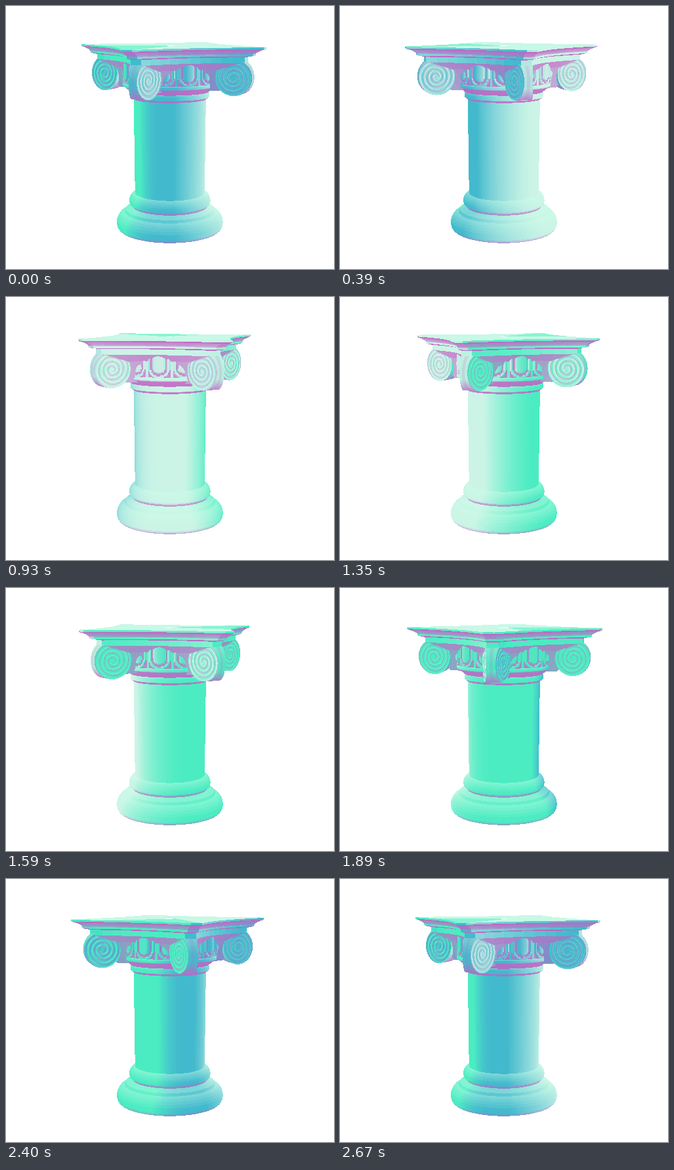
Write an HTML page with a canvas that moves like this. It is 500 px wide and 400 px high and loops after 2700 ms.

```html
<!DOCTYPE html>
<html lang="en">
<head>
<meta charset="utf-8">
<title>Turning column</title>
<style>
html, body { margin: 0; width: 100%; height: 100%; overflow: hidden; background: #fff; }
canvas { display: block; width: 500px; height: 400px; }
</style>
</head>
<body>
<canvas id="stage" width="500" height="400"></canvas>
<script>
const W = 500, H = 400, CX = 249.8, HORIZON = 13.2, DIST = 1106;
const STEP = 30, LOOP = 2700, TURN = 89;
const TAU = Math.PI * 2, RAD = Math.PI / 180;
const CORNER = 22.7 * RAD;

const BLUE = [66, 185, 205], PALE = [203, 244, 230], GREEN = [75, 236, 194];
const MINT = [204, 255, 232], DARK = [194, 98, 196];

const clamp = v => Math.max(0, Math.min(1, v));
const mix = (a, b, t) => a.map((v, i) => v + (b[i] - v) * t);
const lerp = (a, b, t) => a + (b - a) * t;
const fade = (v, from, to) => Math.sin(clamp((v - from) / (to - from)) * Math.PI / 2);
const dir = a => [Math.cos(a), 0, Math.sin(a)];
const sub = (a, b) => a.map((v, i) => v - b[i]);
const cross = (a, b) => [
  a[1] * b[2] - a[2] * b[1], a[2] * b[0] - a[0] * b[2], a[0] * b[1] - a[1] * b[0]
];
const unit = v => {
  const l = Math.hypot(...v) || 1;
  return v.map(c => c / l);
};
// base + p * a + q * b
const along = (base, p, a, q, b) => base.map((v, i) => v + p[i] * a + q[i] * b);

// Three coloured lights stand around the column
function light(n) {
  const az = (450 - Math.atan2(n[2], n[0]) / RAD) % 360;
  let c = mix(BLUE, PALE, fade(az, 5, 110));
  c = mix(c, GREEN, fade(az, 150, 240));
  return mix(c, BLUE, fade(az, 305, 345));
}

function shade(n, dark = 0) {
  const up = -n[1];
  let c = mix(light(n), MINT, clamp(up) * 0.45);
  c = mix(c, DARK, clamp((-up - 0.35) * 1.2));
  return mix(c, DARK, dark);
}

const quads = [];

function grid(point, nu, nv, paint, face) {
  for (let j = 0; j < nv; j++) {
    for (let i = 0; i < nu; i++) {
      const a = point(i, j), b = point(i + 1, j), c = point(i + 1, j + 1), d = point(i, j + 1);
      const n = face || unit(cross(
        sub(along(c, d, 1, c, 0), along(a, b, 1, a, 0)),
        sub(along(b, c, 1, b, 0), along(a, d, 1, a, 0))));
      const [r, g, bl] = paint(n, i, j).map(Math.round);
      quads.push({ pts: [a, b, c, d], n, mid: along(a, sub(c, a), 0.5, a, 0),
        ink: (255 << 24 | bl << 16 | g << 8 | r) >>> 0 });
    }
  }
}

// Draws a moulding profile piece by piece; a bulge gives a half-round piece
class Profile {
  constructor(x, y) { this.rows = [{ x, y }]; }
  to(x, y, bulge = 0, dark = 0) {
    const from = this.rows[this.rows.length - 1], n = bulge ? 10 : 1;
    from.dark = dark;
    for (let k = 1; k <= n; k++) {
      const a = k / n * Math.PI, t = (1 - Math.cos(a)) / 2;
      this.rows.push({ x: lerp(from.x, x, t) + bulge * Math.sin(a), y: lerp(from.y, y, t), dark });
    }
    return this;
  }
}

// Round parts: x is the radius
function lathe({ rows }) {
  grid((i, j) => {
    const { x, y } = rows[j], a = i / 120 * TAU;
    return [x * Math.cos(a), y - HORIZON, x * Math.sin(a)];
  }, 120, rows.length - 1, (n, i, j) => shade(n, rows[j].dark));
}

// Square parts with hollow sides: x is the inset from the slab's edge
function sweep({ rows }) {
  grid((i, j) => {
    const { x, y } = rows[j], t = i % 11 / 5 - 1;
    const psi = CORNER + Math.PI / 4 + Math.floor(i / 11) * Math.PI / 2;
    const hollow = Math.min(15, 100 - x) * (1 - t * t);
    return along([0, y, 0], dir(psi), 111 - x - hollow, dir(psi + Math.PI / 2), t * (100 - x));
  }, 44, rows.length - 1, (n, i, j) => shade(n, rows[j].dark));
}

function eggs() {
  const pitch = TAU / 12, nu = 240, nv = 18;
  const place = (i, j) => {
    const a = i / nu * TAU, s = (a - CORNER - Math.PI / 4) / pitch;
    const p = (s - Math.round(s)) * pitch * 72, y = 69 + j / nv * 34;
    const d = Math.hypot(p, Math.max(0, y - 88));
    return { a, y, p, d, ridge: d > 12.5 && d < 16.5 };
  };
  grid((i, j) => {
    const { a, y, d, ridge } = place(i, j);
    const r = 70 + (ridge ? 2 : 4 * Math.sqrt(Math.max(0, 1 - d * d / 100)));
    return [r * Math.cos(a), y, r * Math.sin(a)];
  }, nu, nv, (n, i, j) => {
    const { d, p, ridge } = place(i + 0.5, j + 0.5);
    return shade(n, ridge || d < 9.5 || Math.abs(p) > 17.5 ? 0.05 : 0.65);
  });
}

function volute(phi) {
  const R = 27, down = [0, 1, 0];
  const side = s => ({
    mid: along([0, 91, 0], dir(phi), 105.5, dir(phi + Math.PI / 2), 13 * s),
    out: dir(phi - 15 * RAD * s),
    n: dir(phi + 75 * RAD * s)
  });
  const left = side(1), right = side(-1);
  const on = (f, r, a) => along(f.mid, f.out, r * Math.cos(a), down, r * Math.sin(a));

  for (const f of [left, right]) {
    const nu = 56, nv = 18;
    grid((i, j) => on(f, R * j / nv, i / nu * TAU), nu, nv, (n, i, j) => {
      const r = R * (j + 0.5) / nv, a = (i + 0.5) / nu * TAU;
      if (r < 3) return shade(n);
      const w = (r / 6.5 - a / TAU) * TAU, k = Math.sin(w) * 0.55;
      const bent = unit(along(n, f.out, k * Math.cos(a), down, k * Math.sin(a)));
      return shade(bent, Math.max(0, Math.cos(w) - 0.3) * 0.5);
    }, f.n);
  }
  grid((i, j) => {
    const a = i / 48 * TAU;
    return mix(on(left, R, a), on(right, R, a), j / 3);
  }, 48, 3, (n, i, j) => shade(n, j === 1 ? 0.2 : 0.05));
}

// Slab and the web that carries the volutes
sweep(new Profile(100, 47).to(0, 47).to(0, 49.5).to(2, 51, 0, 0.9).to(11, 57.5, 2, 0.3)
  .to(12, 60).to(20, 62, 0, 0.7).to(20, 70).to(30, 80, 0, 0.5).to(48, 112, 0, 0.5));
eggs();
for (let k = 0; k < 4; k++) volute(CORNER + k * Math.PI / 2);
// Neck, shaft and foot
lathe(new Profile(70, 116).to(69, 122, 2).to(59, 130, 0, 0.7).to(59, 138, 1)
  .to(55, 141, 0, 0.6).to(53, 283).to(57, 301, 6.5).to(57, 303, 0, 0.6)
  .to(67, 307).to(69, 311).to(73, 337.5, 9.5));

const ctx = document.getElementById('stage').getContext('2d');
const image = ctx.createImageData(W, H);
const pixels = new Uint32Array(image.data.buffer);
const depth = new Float32Array(W * H);

function fill(a, b, c, ink) {
  const area = (b[0] - a[0]) * (c[1] - a[1]) - (b[1] - a[1]) * (c[0] - a[0]);
  if (Math.abs(area) < 1e-6) return;
  const x0 = Math.max(0, Math.floor(Math.min(a[0], b[0], c[0])));
  const x1 = Math.min(W - 1, Math.ceil(Math.max(a[0], b[0], c[0])));
  const y0 = Math.max(0, Math.floor(Math.min(a[1], b[1], c[1])));
  const y1 = Math.min(H - 1, Math.ceil(Math.max(a[1], b[1], c[1])));
  for (let y = y0; y <= y1; y++) {
    for (let x = x0; x <= x1; x++) {
      const px = x + 0.5 - a[0], py = y + 0.5 - a[1];
      const v = (px * (c[1] - a[1]) - py * (c[0] - a[0])) / area;
      const w = (py * (b[0] - a[0]) - px * (b[1] - a[1])) / area;
      if (v < -1e-6 || w < -1e-6 || v + w > 1.000001) continue;
      const s = a[2] + v * (b[2] - a[2]) + w * (c[2] - a[2]), k = y * W + x;
      if (s > depth[k]) {
        depth[k] = s;
        pixels[k] = ink;
      }
    }
  }
}

function draw(turn) {
  const co = Math.cos(turn), si = Math.sin(turn);
  const eyeX = DIST * si, eyeZ = DIST * co;
  const project = ([x, y, z]) => {
    const s = DIST / (DIST - x * si - z * co);
    return [CX + (x * co - z * si) * s, HORIZON + y * s, s];
  };
  pixels.fill(0xffffffff);
  depth.fill(0);
  for (const { pts, n, mid, ink } of quads) {
    const facing = n[0] * (eyeX - mid[0]) - n[1] * mid[1] + n[2] * (eyeZ - mid[2]);
    if (facing <= 0) continue;
    const [a, b, c, d] = pts.map(project);
    fill(a, b, c, ink);
    fill(a, c, d, ink);
  }
  ctx.putImageData(image, 0, 0);
}

let shown = -1;
const start = performance.now();
function tick() {
  const step = Math.floor((performance.now() - start) % LOOP / STEP);
  if (step !== shown) {
    shown = step;
    draw(step / TURN * TAU);
  }
  requestAnimationFrame(tick);
}
tick();
</script>
</body>
</html>
```
